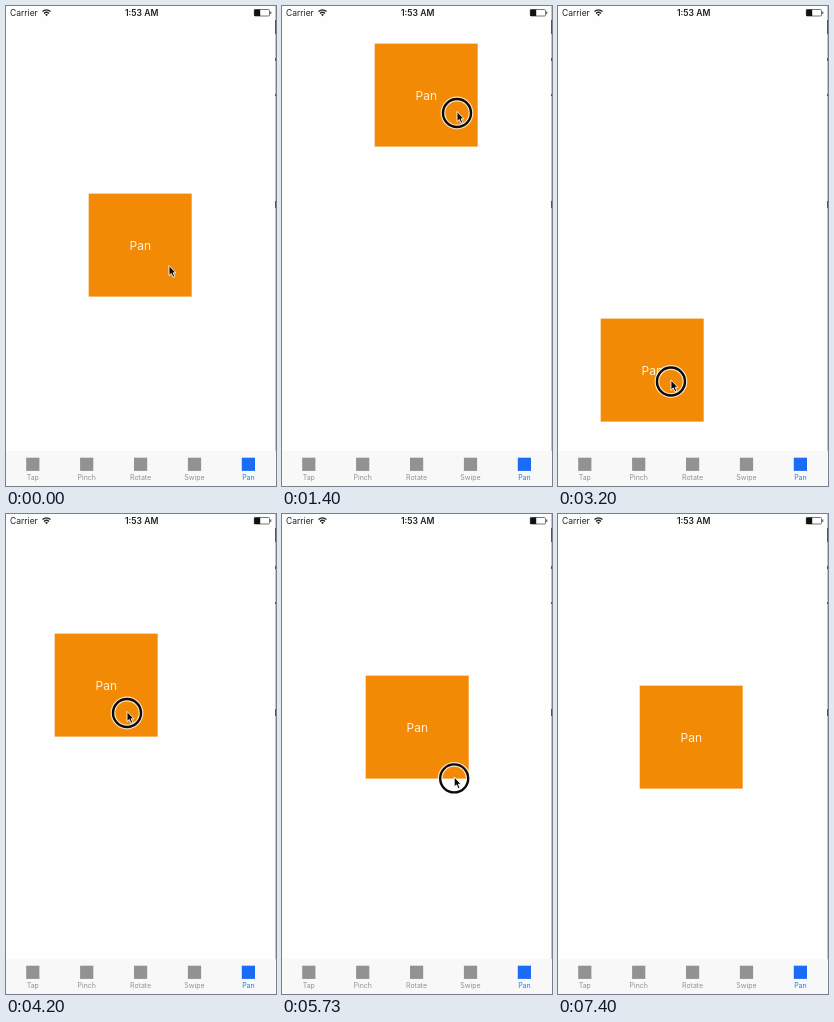
An HTML page that plays this animation: 270x480 px, repeating every 7990 ms.

```html
<!DOCTYPE html>
<html lang="en">
<head>
<meta charset="utf-8">
<title>Pan gesture</title>
<style>
  html, body { margin: 0; width: 100%; height: 100%; overflow: hidden; background: #fff; }
  svg { display: block; width: 270px; height: 480px; font-family: Inter, Roboto, sans-serif; }
  text { text-anchor: middle; }
  .label { font-size: 7px; }
</style>
</head>
<body>
<svg viewBox="0 0 270 480">
  <rect width="270" height="480" fill="#fefefe"/>

  <g id="box">
    <rect x="-.3" y="-.4" width="103" height="103" fill="#f28a06"/>
    <text x="51.3" y="55.5" font-size="12" fill="#fff0d8">Pan</text>
  </g>

  <g fill="#222">
    <text x="4" y="10" font-size="8.5" style="text-anchor:start">Carrier</text>
    <text x="135.7" y="10" font-size="8.6" font-weight="600">1:53 AM</text>
    <path d="M36.5 5.6Q40.5 2.2 44.5 5.6M38 7.4Q40.5 5.2 43 7.4" fill="none" stroke="#222" stroke-width="1.3"/>
    <path d="M39 8.6Q40.5 7.4 42 8.6L40.5 10.2Z"/>
    <rect x="248.3" y="3.5" width="15.2" height="6.5" rx="1" fill="none" stroke="#555" stroke-width=".8"/>
    <rect x="248.2" y="3.5" width="6" height="6.5" fill="#111"/>
    <rect x="264.2" y="5.5" width="1.1" height="2.5" fill="#555"/>
  </g>

  <rect x="269" width="1" height="445" fill="#c4c4c4"/>
  <path d="M269.5 14V28M269.5 52V55M269.5 88V90M269.5 195V202" stroke="#555"/>

  <g id="bar">
    <rect y="445" width="270" height="35" fill="#f8f8f8" fill-opacity=".94"/>
  </g>

  <g id="pointer">
    <g id="ring" fill="none">
      <circle r="14" stroke="#fff" stroke-opacity=".75" stroke-width="4.8"/>
      <circle r="14" stroke="#0b0b0b" stroke-width="2.4"/>
    </g>
    <path d="M0-1.5V8.6L2.3 6.5L4 10.3L5.8 9.5L4.2 5.8H7Z" fill="#0b0b0b"
          stroke="#fff" stroke-width=".9" stroke-linejoin="round"/>
  </g>
</svg>
<script>
const LOOP = 7990, TICK = 1000 / 15;
const PRESS = 4, RELEASE = 102, LEAVE = 106, GONE = 108;
const GRIP = [80, 73];

// Turning points of the drag: tick, x, y
const path = [
  [4, 83, 188], [15, 20, 78], [21, 93, 38], [22, 95, 34], [27, 122, 48],
  [35, 143, 192], [45, 78, 321], [48, 43, 313], [51, 26, 268], [57, 115, 107],
  [60, 102, 66], [63, 49, 120], [64, 41, 126], [66, 23, 210], [70, 140, 348],
  [75, 57, 232], [77, 92, 174], [82, 149, 74], [85, 66, 130], [86, 84, 162],
  [92, 120, 318], [97, 71, 225], [102, 82, 172]
];
const last = path.length - 1;

const el = id => document.getElementById(id);
const box = el('box'), pointer = el('pointer'), ring = el('ring');
const move = (node, x, y) => node.setAttribute('transform', `translate(${x} ${y})`);
const show = (node, on) => node.setAttribute('visibility', on ? 'inherit' : 'hidden');

function slope(i, axis) {
  const a = path[Math.max(0, i - 1)], b = path[Math.min(last, i + 1)];
  return (b[axis] - a[axis]) / (b[0] - a[0]);
}

// Cubic Hermite curve through the turning points
function place(tick) {
  const k = Math.min(Math.max(tick, path[0][0]), path[last][0]);
  const i = Math.max(1, path.findIndex(p => p[0] >= k)) - 1;
  const a = path[i], b = path[i + 1], span = b[0] - a[0];
  const u = (k - a[0]) / span, v = 1 - u;
  return [1, 2].map(n =>
    a[n] * (1 + 2 * u) * v * v + b[n] * u * u * (3 - 2 * u) +
    span * u * v * (slope(i, n) * v - slope(i + 1, n) * u));
}

function draw(time) {
  const k = Math.floor((time % LOOP + 4) / TICK);
  move(box, ...place(k).map(Math.round));

  // The box trails the pointer by one tick; after release the pointer leaves up and right
  const [x, y] = place(k + 1);
  const out = Math.max(0, k - LEAVE + 1) / 2;
  move(pointer, x + GRIP[0] + 90 * out, y + GRIP[1] - 186 * out);
  show(pointer, k < GONE);
  show(ring, k >= PRESS && k < RELEASE);
}

const tabs = ['Tap', 'Pinch', 'Rotate', 'Swipe', 'Pan'];
el('bar').insertAdjacentHTML('beforeend', tabs.map((name, i) => {
  const x = 26.8 + 53.9 * i;
  const [icon, ink] = name === 'Pan' ? ['#1a6cf6', '#1f7ff0'] : ['#929292', '#929292'];
  return `<rect x="${x - 6.6}" y="451.7" width="13.2" height="13.2" fill="${icon}"/>
    <text class="label" x="${x}" y="473.5" fill="${ink}">${name}</text>`;
}).join(''));

const start = performance.now();
function loop(now) {
  draw(Math.max(0, now - start));
  requestAnimationFrame(loop);
}
draw(0);
requestAnimationFrame(loop);
</script>
</body>
</html>
```
